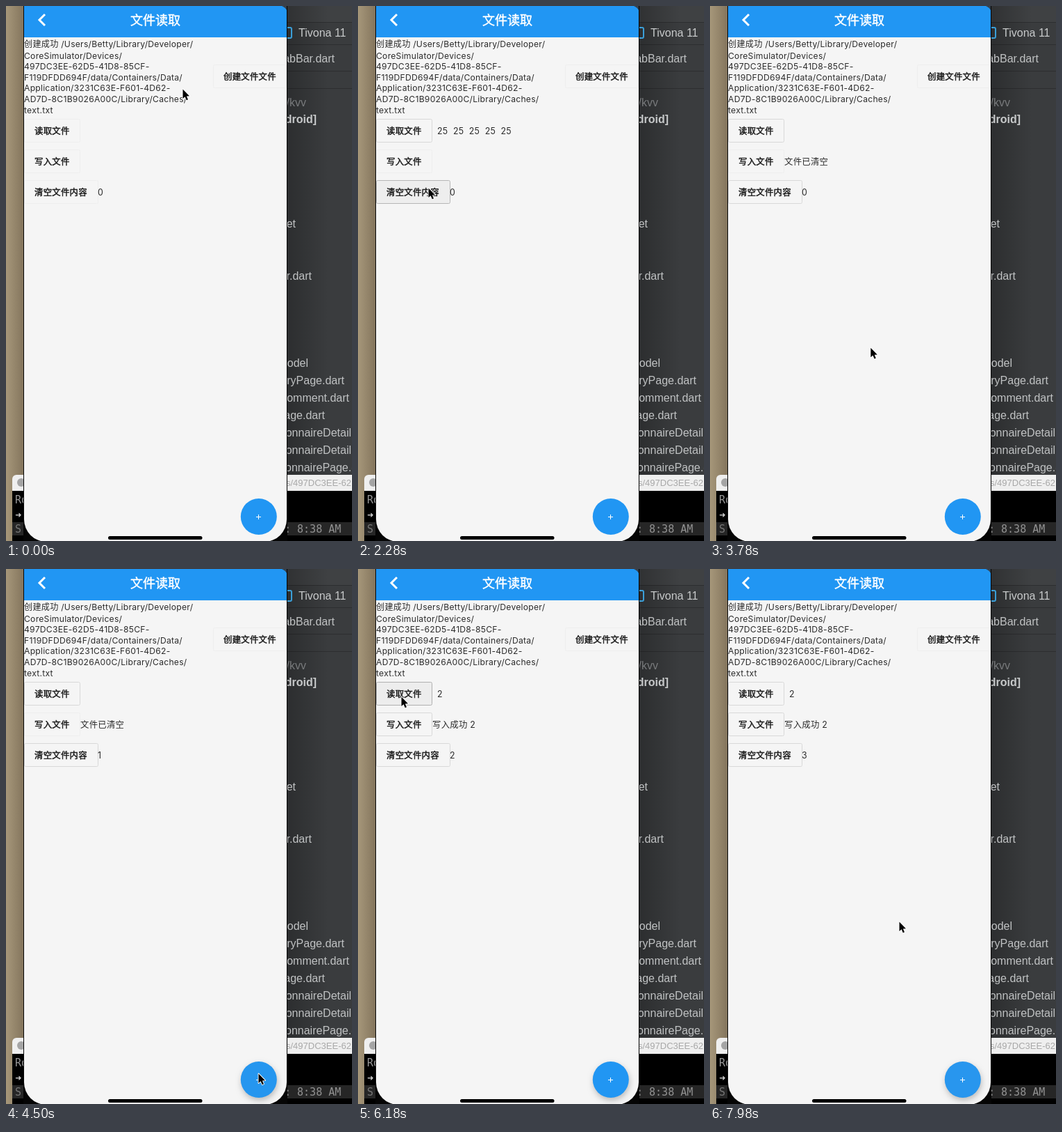
Animation, 498 px wide and 768 px high, one loop 8 s. Source, as an HTML page with a canvas:

```html
<!DOCTYPE html>
<html lang="zh-CN">
<head>
<meta charset="utf-8">
<title>文件读取</title>
<style>
  html, body { margin: 0; width: 100%; height: 100%; overflow: hidden; background: #000; }
  canvas { display: block; width: 498px; height: 768px; }
</style>
</head>
<body>
<canvas id="stage" width="498" height="768"></canvas>
<script>
const ctx = document.getElementById('stage').getContext('2d');
const W = 498, H = 768, LOOP = 8000, STEP = 60;
const APP = "Inter, 'Noto Sans CJK SC', 'Noto Sans CJK', sans-serif";
const IDE = "'Liberation Sans', Arial, sans-serif";
const MONO = "'DejaVu Sans Mono', monospace";

// Pointer stops: time, x, y of the tip
const PATH = [
  [0, 254, 119], [240, 254, 119], [900, 66, 183], [1500, 66, 183],
  [2000, 101, 261], [2450, 101, 261], [2850, 57, 183], [3420, 57, 183],
  [4080, 363, 724], [4800, 363, 724], [5340, 64, 227], [5700, 64, 227],
  [6000, 62, 183], [6450, 62, 183], [6900, 131, 279], [7440, 363, 724],
  [7700, 363, 724], [7980, 272, 506], [8000, 272, 506]
];
const CLICKS = { read: [1100, 3120, 6180], clear: [2220], write: [5520], add: [4140, 4620, 7660] };

const LINES = [
  '创建成功 /Users/Betty/Library/Developer/',
  'CoreSimulator/Devices/',
  '497DC3EE-62D5-41D8-85CF-',
  'F119DFDD694F/data/Containers/Data/',
  'Application/3231C63E-F601-4D62-',
  'AD7D-8C1B9026A00C/Library/Caches/',
  'text.txt'
];
// Visible ends of project tree rows: text, right edge, centre y
const TREE = [
  ['TabBar.dart', 473, 75], ['et', 417, 312], ['r.dart', 440, 387], ['model', 435, 512],
  ['ryPage.dart', 487, 537], ['omment.dart', 494, 562], ['Page.dart', 459, 587],
  ['onnaireDetail', 497, 612], ['onnaireDetail', 497, 637]
];

function rect(x, y, w, h, fill) {
  ctx.fillStyle = fill;
  ctx.fillRect(x, y, w, h);
}

function text(str, x, y, font, color, align = 'left', spacing = 0) {
  ctx.font = font;
  ctx.fillStyle = color;
  ctx.textAlign = align;
  ctx.letterSpacing = spacing + 'px';
  ctx.fillText(str, x, y);
}

// Medium weight: regular glyphs with a hairline outline
function mediumText(str, x, y, font, color, align, spacing) {
  text(str, x, y, font, color, align, spacing);
  ctx.strokeStyle = color;
  ctx.lineWidth = 0.45;
  ctx.strokeText(str, x, y);
}

function label(str, x, cy, paint = text, color = '#2c2c2c') {
  paint(str, x, cy + 4.5, `12.4px ${APP}`, color, 'left', 0.25);
}

function fadeX(x, w, from, to) {
  const g = ctx.createLinearGradient(x, 0, x + w, 0);
  g.addColorStop(0, from);
  g.addColorStop(1, to);
  return g;
}

function pressLevel(times, t) {
  const last = times.filter(c => c <= t).pop();
  return last === undefined ? 0 : Math.max(0, 1 - (t - last) / 420);
}

function desktop() {
  rect(0, 0, 26, H, fadeX(0, 26, '#a6977a', '#83745c'));
}

function editor() {
  rect(404, 0, 94, H, '#3a3c3e');
  rect(404, 0, 94, 23, '#3f4143');
  for (const y of [23, 55, 93, 118]) rect(404, y, 94, 1, '#2d2e30');
  rect(404, 0, 94, H, fadeX(404, 60, 'rgba(0,0,0,.24)', 'rgba(0,0,0,0)'));

  ctx.strokeStyle = '#3b9fd8';
  ctx.lineWidth = 2;
  ctx.beginPath();
  ctx.roundRect(399, 31, 12, 15, 2);
  ctx.stroke();

  const font = `16px ${IDE}`;
  text('Tivona 11', 421, 44, font, '#c8cacb');
  for (const [str, x, y] of TREE) text(str, x, y + 6, font, '#c0c2c3', 'right');
  text('onnairePage.dart', 402, 668, font, '#c0c2c3');
  text('/kvv', 432, 144, font, '#787a7c', 'right');
  text('android]', 447, 168, `bold ${font}`, '#c6c8c9', 'right');
}

function terminal() {
  ctx.fillStyle = '#efefef';
  ctx.beginPath();
  ctx.roundRect(9, 673, 500, 30, 6);
  ctx.fill();
  ctx.fillStyle = '#a5a5a5';
  ctx.beginPath();
  ctx.arc(22, 684, 6, 0, Math.PI * 2);
  ctx.fill();
  text('s/497DC3EE-62D5', 403, 689, `13px ${IDE}`, '#a8a8a8');

  rect(9, 696, 489, 72, '#000');
  rect(9, 741, 489, 19, '#262626');
  const font = `15px ${MONO}`;
  text('Ro', 13, 714, font, '#969696');
  text('➜', 13, 736, font, '#d0d0d0');
  text('S', 13, 756, font, '#777');
  text(': 8:38 AM', 401, 756, font, '#929292');
}

function button(str, x, cy, w, raised, press = 0) {
  const y = cy - 17;
  ctx.beginPath();
  ctx.roundRect(x + 0.5, y + 0.5, w - 1, 33, 2);
  ctx.fillStyle = `rgba(0,0,0,${0.03 * press})`;
  ctx.fill();
  ctx.lineWidth = 1;
  const tone = Math.round((raised ? 216 : 238) - 40 * press);
  ctx.strokeStyle = `rgb(${tone},${tone},${tone})`;
  ctx.stroke();
  label(str, x + 15, cy, mediumText, '#1a1a1a');
}

function appBar() {
  rect(25, 0, 380, 45, '#2196f3');
  ctx.strokeStyle = '#fff';
  ctx.lineWidth = 3;
  ctx.beginPath();
  ctx.moveTo(56, 12);
  ctx.lineTo(48, 20);
  ctx.lineTo(56, 28);
  ctx.stroke();
  mediumText('文件读取', 215, 26.5, `18px ${APP}`, '#fff', 'center');
}

function addButton(t) {
  ctx.save();
  if (t >= CLICKS.add[0]) {
    ctx.shadowColor = 'rgba(0,0,0,.24)';
    ctx.shadowBlur = 8;
    ctx.shadowOffsetX = 1;
    ctx.shadowOffsetY = 4;
  }
  ctx.fillStyle = '#2196f3';
  ctx.beginPath();
  ctx.arc(363.8, 733, 26, 0, Math.PI * 2);
  ctx.fill();
  ctx.restore();
  ctx.fillStyle = `rgba(150,150,150,${0.25 * pressLevel(CLICKS.add, t)})`;
  ctx.fill();
  rect(360, 733, 7, 1, '#fff');
  rect(363, 730, 1, 7, '#fff');
}

function phone(t) {
  rect(25, 0, 380, H, '#050505');
  ctx.save();
  ctx.beginPath();
  ctx.roundRect(26, -1, 378, 770, [0, 0, 32, 32]);
  ctx.clip();
  rect(26, 0, 378, H, '#f5f5f5');
  appBar();
  ctx.fillStyle = '#34414d';
  ctx.beginPath();
  ctx.moveTo(397, 0);
  ctx.quadraticCurveTo(402, 2, 404, 6);
  ctx.lineTo(404, 0);
  ctx.fill();

  LINES.forEach((line, i) => {
    const y = i ? 60 + i * 15.6 : 59;
    text(line, 26, y, `12.15px ${APP}`, '#2c2c2c', 'left', 0.25);
  });

  const firstRead = CLICKS.read[0], lastRead = CLICKS.read[2];
  const cleared = t >= CLICKS.clear[0] + 180;
  const written = t >= CLICKS.write[0];
  const count = CLICKS.add.filter(c => c <= t).length;

  button('创建文件文件', 298, 101, 106, false);
  button('读取文件', 26, 179, 81, t >= firstRead, pressLevel(CLICKS.read, t));
  button('写入文件', 26, 223, 81, written, pressLevel(CLICKS.write, t));
  button('清空文件内容', 26, 267, 107, t >= CLICKS.clear[0], pressLevel(CLICKS.clear, t));

  if (t >= lastRead) label('2', 114, 179);
  else if (t >= firstRead && !cleared) label(Array(5).fill('25').join('  '), 114, 179);
  if (written) label('写入成功 2', 107, 223);
  else if (cleared) label('文件已清空', 107, 223);
  label(String(count), 132, 267);

  addButton(t);
  ctx.fillStyle = '#000';
  ctx.beginPath();
  ctx.roundRect(147, 761, 135.5, 5, 2.5);
  ctx.fill();
  ctx.restore();
}

function pointerAt(t) {
  const i = PATH.findIndex(p => p[0] > t);
  const [t0, x0, y0] = PATH[i - 1], [t1, x1, y1] = PATH[i];
  const u = (t - t0) / (t1 - t0);
  const e = u * u * (3 - 2 * u);
  return [x0 + (x1 - x0) * e, y0 + (y1 - y0) * e];
}

function pointer(t) {
  const [x, y] = pointerAt(t);
  ctx.save();
  ctx.translate(x, y);
  ctx.beginPath();
  ctx.moveTo(0.5, 0.5);
  for (const [px, py] of [[0.5, 14], [3.6, 11.2], [5.8, 16.2], [8, 15.2], [5.9, 10.4], [10, 10.2]]) ctx.lineTo(px, py);
  ctx.closePath();
  ctx.lineJoin = 'round';
  ctx.lineWidth = 1.8;
  ctx.strokeStyle = '#fff';
  ctx.stroke();
  ctx.fillStyle = '#000';
  ctx.fill();
  ctx.restore();
}

function draw() {
  const t = Math.floor((performance.now() % LOOP) / STEP) * STEP;
  ctx.clearRect(0, 0, W, H);
  desktop();
  editor();
  terminal();
  phone(t);
  pointer(t);
  requestAnimationFrame(draw);
}
draw();
</script>
</body>
</html>
```
